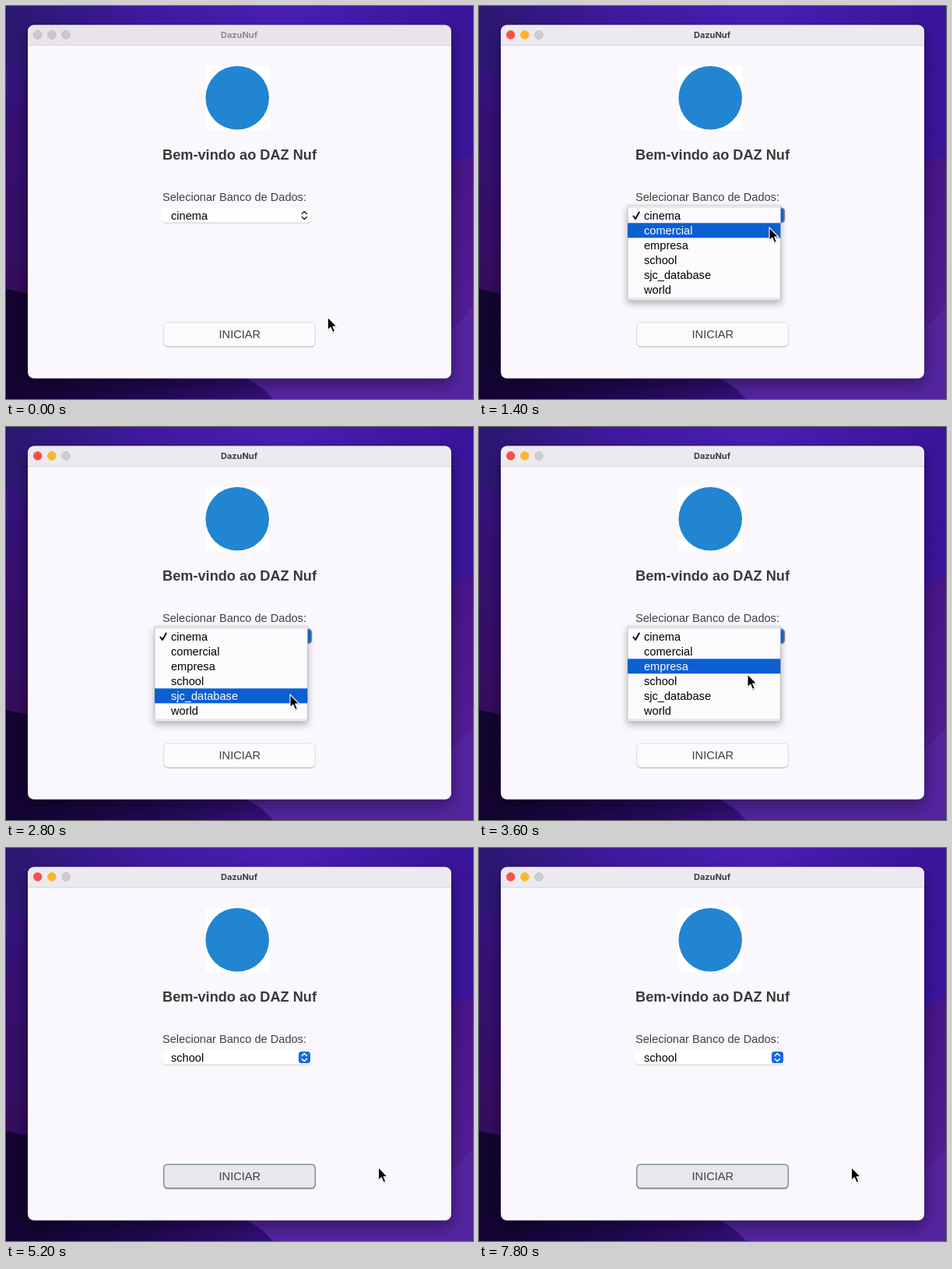
Recreate the animation shown at these times as an HTML page. Size 600 by 504 pixels, loop 8 s.

```html
<!DOCTYPE html>
<html lang="pt">
<head>
<meta charset="utf-8">
<title>DazuNuf</title>
<style>
  html, body { margin: 0; width: 100%; height: 100%; overflow: hidden; background: #2b0d62; }
  svg { display: block; width: 600px; height: 504px; }
  text { font: 14.6px "Liberation Sans", Arial, sans-serif; fill: #404043; }
  #title { font: 700 11px Inter, sans-serif; }
  #heading { font-size: 18.2px; font-weight: 700; fill: #39393c; }
  .item, #value { fill: #000; }
</style>
</head>
<body>
<svg viewBox="0 0 600 504">
  <defs>
    <linearGradient id="sky">
      <stop offset="0" stop-color="#2b176f"/>
      <stop offset=".3" stop-color="#4019a0"/>
      <stop offset=".6" stop-color="#4a1eb4"/>
      <stop offset="1" stop-color="#3a139a"/>
    </linearGradient>
    <linearGradient id="leftHill" x2="0" y2="1">
      <stop offset="0" stop-color="#35127c"/>
      <stop offset="1" stop-color="#35094f"/>
    </linearGradient>
    <linearGradient id="rightHill" x2="0" y2="1">
      <stop offset="0" stop-color="#481488"/>
      <stop offset="1" stop-color="#572198"/>
    </linearGradient>
    <linearGradient id="valley">
      <stop offset="0" stop-color="#12032f"/>
      <stop offset=".55" stop-color="#210852"/>
      <stop offset="1" stop-color="#35107a"/>
    </linearGradient>
    <filter id="windowShadow" x="-20%" y="-20%" width="140%" height="140%">
      <feDropShadow dx="0" dy="7" stdDeviation="10" flood-opacity=".42"/>
    </filter>
    <filter id="menuShadow" x="-20%" y="-20%" width="140%" height="150%">
      <feDropShadow dx="0" dy="4" stdDeviation="5" flood-opacity=".3"/>
    </filter>
    <filter id="softShadow" x="-20%" y="-30%" width="150%" height="170%">
      <feDropShadow dx="0" dy=".8" stdDeviation=".7" flood-opacity=".3"/>
    </filter>
    <clipPath id="windowClip"><rect x="28" y="24.5" width="544" height="453" rx="8"/></clipPath>
  </defs>

  <rect width="600" height="504" fill="url(#sky)"/>
  <path d="M0 75Q60 110 130 240V504H0Z" fill="url(#leftHill)"/>
  <path d="M600 190Q480 240 380 504H600Z" fill="url(#rightHill)"/>
  <path d="M0 363Q200 400 350 504H0Z" fill="url(#valley)"/>
  <path d="M300 470Q326 484 343 504H600V385Q570 425 500 450Z" fill="#54249f"/>

  <rect x="28" y="24.5" width="544" height="453" rx="8" fill="#faf8fc" filter="url(#windowShadow)"/>
  <g clip-path="url(#windowClip)">
    <rect id="bar" x="28" y="24" width="544" height="26"/>
    <path d="M28 50.3H572" stroke="#d6d3d9"/>
  </g>
  <g id="lights" stroke-width=".7">
    <circle cx="40.7" cy="37" r="5.4"/>
    <circle cx="58.8" cy="37" r="5.4"/>
    <circle cx="77" cy="37" r="5.4"/>
  </g>
  <text id="title" x="299.5" y="41" text-anchor="middle">DazuNuf</text>

  <rect x="256" y="77" width="82" height="82" fill="#fff"/>
  <circle cx="297.2" cy="117.8" r="40.8" fill="#2185d1"/>
  <text id="heading" x="201" y="196.5">Bem-vindo ao DAZ Nuf</text>
  <text x="201" y="250">Selecionar Banco de Dados:</text>

  <rect id="select" x="201" y="259.5" width="191.5" height="18" rx="4.5" fill="#fff" filter="url(#softShadow)"/>
  <rect id="knob" x="376" y="261" width="15" height="15" rx="3.5" fill="#176be0"/>
  <path id="chevrons" d="M380.2 266.5L383.3 263.5L386.4 266.5M380.2 270.5L383.3 273.5L386.4 270.5"
        fill="none" stroke-width="1.5" stroke-linecap="round" stroke-linejoin="round"/>
  <text id="value" x="212" y="274"></text>

  <rect id="button" x="202.7" y="405.7" width="194.6" height="30.6" rx="5" filter="url(#softShadow)"/>
  <text x="300.3" y="426.2" text-anchor="middle">INICIAR</text>

  <g id="menu">
    <rect x="384" y="259.3" width="8.4" height="18" rx="4" fill="#176be0" stroke="#77879d" stroke-width="1.6"/>
    <rect x="191" y="256" width="196.3" height="121" fill="#fbfafc" stroke="#b3b1b7" stroke-width=".8" filter="url(#menuShadow)"/>
    <path d="M191.5 257.5H387M191.5 375.5H387" stroke="#e9e7eb" stroke-width="3"/>
    <rect id="highlight" x="191" width="196.3" height="19" fill="#0a5fd3"/>
    <path id="check" d="M198.4 269.5L201 273L205.8 264.5" fill="none" stroke-width="1.9" stroke-linecap="round" stroke-linejoin="round"/>
  </g>

  <path id="cursor" d="M0 0V16.6L3.8 13.1L6.6 19.4L9.4 18.2L6.7 12.1H11.8Z"
        fill="#000" stroke="#fff" stroke-width="1.1" stroke-linejoin="round" filter="url(#softShadow)"/>
</svg>
<script>
const LOOP = 8000, STEP = 200;
const ACTIVATE = 600, OPEN = 800, CHOOSE = 4000, PRESS = 4600;
const ROW_TOP = 259.3, ROW_HEIGHT = 19;
const databases = ["cinema", "comercial", "empresa", "school", "sjc_database", "world"];

// Cursor stops: time, x, y
const stops = [
  [0, 413.3, 399], [200, 411, 392], [600, 384, 272], [1000, 381, 270],
  [1400, 373, 284], [2000, 369, 330], [2400, 366, 364], [2800, 365, 343],
  [3200, 355, 303], [3400, 348, 305], [3600, 345, 317], [3800, 343, 326],
  [4000, 343, 327], [4400, 333, 412], [4700, 336, 420], [5200, 478.5, 409.5], [LOOP, 478.5, 409.5]
];

const el = id => document.getElementById(id);
const set = (node, attributes) => {
  for (const name in attributes) node.setAttribute(name, attributes[name]);
};

const items = databases.map((name, i) => {
  const item = document.createElementNS(el("menu").namespaceURI, "text");
  item.textContent = name;
  set(item, { class: "item", x: 212, y: 274 + i * ROW_HEIGHT });
  return el("menu").appendChild(item);
});

function cursorAt(t) {
  const next = Math.max(1, stops.findIndex(stop => stop[0] >= t));
  const [t0, x0, y0] = stops[next - 1], [t1, x1, y1] = stops[next];
  const p = (t - t0) / (t1 - t0), ease = p * p * (3 - 2 * p);
  return [x0 + (x1 - x0) * ease, y0 + (y1 - y0) * ease];
}

function draw(t) {
  const active = t >= ACTIVATE, open = t >= OPEN && t < CHOOSE, pressed = t >= PRESS;

  set(el("bar"), { fill: active ? "#eceaef" : "#e8e4e9" });
  el("title").style.fill = active ? "#3d3b40" : "#8d8a90";
  const colors = active ? ["#fb5047", "#fab827", "#cfcdd2"] : Array(3).fill("#cbc8cd");
  [...el("lights").children].forEach((light, i) =>
    set(light, { fill: colors[i], stroke: active && i < 2 ? colors[i] : "#bab7bd" }));

  set(el("knob"), { visibility: active ? "visible" : "hidden" });
  set(el("chevrons"), { stroke: active ? "#fff" : "#222" });
  el("value").textContent = databases[t < CHOOSE ? 0 : 3];
  set(el("button"), {
    fill: pressed ? "#e9e7eb" : "#fbfafc",
    stroke: pressed ? "#8292a5" : "#dcd9df",
    "stroke-width": pressed ? 1.6 : 0.8
  });

  set(el("menu"), { visibility: open ? "visible" : "hidden" });
  // The highlight trails slightly behind the cursor.
  const trailingY = cursorAt(Math.max(0, t - STEP / 2))[1];
  const row = Math.max(0, Math.min(5, Math.floor((trailingY - ROW_TOP) / ROW_HEIGHT)));
  set(el("highlight"), { y: ROW_TOP + row * ROW_HEIGHT });
  set(el("check"), { stroke: row === 0 ? "#fff" : "#000" });
  items.forEach((item, i) => { item.style.fill = i === row ? "#fff" : "#000"; });

  set(el("cursor"), { transform: `translate(${cursorAt(t)})` });
}

const start = performance.now();
function tick() {
  const t = (performance.now() - start) % LOOP;
  draw(Math.floor(t / STEP) * STEP);
  requestAnimationFrame(tick);
}
tick();
</script>
</body>
</html>
```
